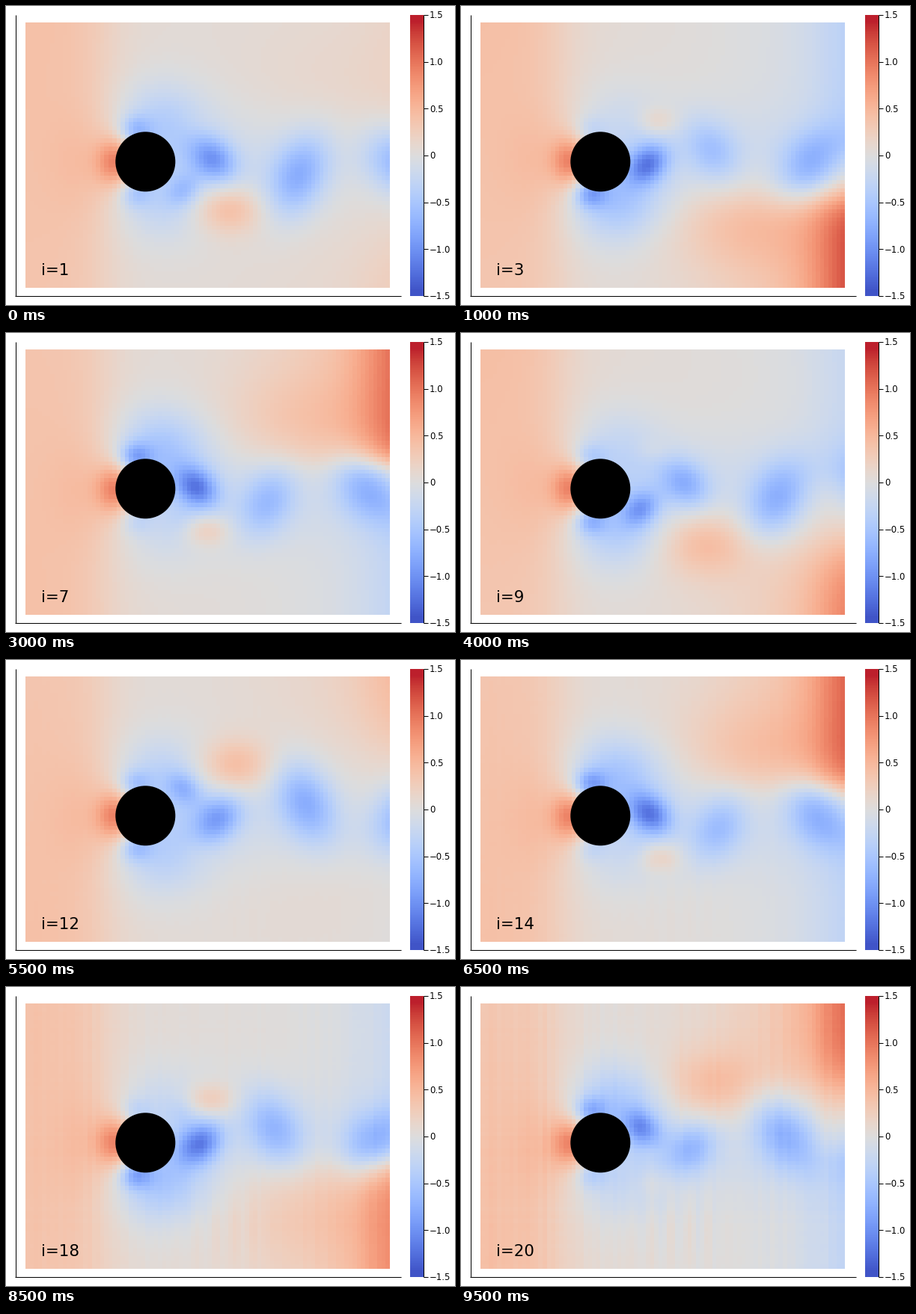
Animation of 600x400 px, one loop 10000 ms. Source, as a matplotlib script:

```python
import numpy as np
import matplotlib.pyplot as plt
from matplotlib.animation import FuncAnimation
from matplotlib.patches import Circle

W, H = 600, 400
FRAMES, INTERVAL = 20, 500
PERIOD = 7.158                      # shedding period, in frames
SPEED = 38                          # drift downstream, pixels per frame
LEFT, RIGHT, TOP, BOTTOM = 26, 513, 22, 377
COLS, ROWS = 88, 64
CX, CY, RADIUS = 186.3, 208.3, 40
PX = 0.72                           # one pixel in points

x = LEFT + (np.arange(COLS) + 0.5) * (RIGHT - LEFT) / COLS
y = TOP + (np.arange(ROWS) + 0.5) * (BOTTOM - TOP) / ROWS
X, Y = np.meshgrid(x, y)
rng = np.random.default_rng(4)
COL_NOISE = rng.normal(size=(1, COLS))
ROW_NOISE = rng.normal(size=(ROWS, 1))


def bell(u, centre, width):
    return np.exp(-((u - centre) / width) ** 2)


def sigmoid(u):
    return 1 / (1 + np.exp(-u))


def run_up(u, softness):
    """Rest, then ease into unit speed around u = 0."""
    return softness * np.log1p(np.exp(u / softness))


def bump(cx, cy, sx, sy, shear=0):
    dx, dy = X - cx, Y - cy
    return np.exp(-0.5 * (((dx + shear * dy) / sx) ** 2 + (dy / sy) ** 2))


def vortex(age, side):
    """Low-pressure core: forms off the axis, then drifts away."""
    cx = 234 + SPEED * run_up(age - 3.05, 1.2)
    dy = 40 * sigmoid((1.1 - age) / 0.35) + 19 * bell(age, 6.7, 2.3)
    strength = (0.7 * sigmoid(age / 0.6) + 0.25 * bell(age, 2.3, 1.2)
                - 0.28 * bell(age, 5.4, 1.0))
    sx = 15 + 1.7 * max(age, 0)
    sy = sx + 12 * bell(age, 7, 1.5)
    return -strength * bump(cx, CY + side * dy, sx, sy, 0.25 * side)


def crest(age, side):
    """High pressure between two cores, spreading as it moves outward."""
    travel = SPEED * run_up(age + 1, 0.6)
    strength = 0.47 * bell(age, 0.2, 2.3)
    sx = 16 + 0.4 * travel
    return strength * bump(255 + travel, CY + side * (52 + 0.27 * travel), sx, 0.7 * sx)


def outlet(age, side):
    """Pressure pulse along one half of the right border."""
    since_peak = (age - 1.7 + PERIOD / 2) % PERIOD - PERIOD / 2
    strength = 1.65 * bell(since_peak, 0, 1.8) - 0.45
    edge, softness = max(105 - 30 * age, 10), max(32 - 9 * age, 10)
    half = sigmoid((side * (Y - CY) - edge) / softness)
    return strength * half * (0.75 * bell(X, 535, 64) + 0.33 * bell(X, 500, 150))


def cylinder_side(age, side):
    swing = np.cos(2 * np.pi * (age - 2.1) / PERIOD)
    wide = (0.36 + 0.19 * swing) * bump(206, CY + side * 51, 44, 40)
    tight = (0.42 + 0.20 * swing) * bump(173, CY + side * 43, 15, 13)
    return -wide - tight


def pressure(n):
    p = 0.05 + 0.34 * sigmoid((132 - X) / 20)
    p += 0.75 * bump(147, CY, 17, 22) + 0.20 * bump(126, CY, 42, 48)
    p -= 0.20 * bump(310, CY, 110, 50)
    sway = np.cos(2 * np.pi * (n - 1.2) / PERIOD)
    p -= 0.045 * sway * (Y - CY) / 180 * bell(X, LEFT, 150)

    for side, delay in ((1, 0), (-1, PERIOD / 2)):
        age = (n + delay) % PERIOD
        p += cylinder_side(age, side) + outlet(age, side)
        for cycle in (-1, 0, 1):
            p += vortex(age + cycle * PERIOD, side)
            p += crest(age + cycle * PERIOD, side)

    # Row and column streaks slowly build up
    drift = ((n + 1) / FRAMES) ** 4
    p += drift * (0.014 * COL_NOISE + 0.006 * ROW_NOISE)
    p += drift * 0.08 * np.cos(2 * np.pi * (X - 255) / 25) * bump(295, 325, 38, 38)
    return p


fig = plt.figure(figsize=(W / 100, H / 100), dpi=100, facecolor="white")
ax = fig.add_axes([0, 0, 1, 1])
ax.axis("off")

heat = ax.imshow(pressure(0), cmap="coolwarm", vmin=-1.5, vmax=1.5,
                 extent=(LEFT, RIGHT, BOTTOM, TOP), interpolation="nearest",
                 aspect="auto")
ramp = np.clip(np.linspace(1, 0, 256), 0.02, 0.975)[:, None]
ax.imshow(ramp, cmap="coolwarm", vmin=0, vmax=1, extent=(540, 558, 388, 12),
          interpolation="nearest", aspect="auto")
ax.add_patch(Circle((CX, CY), RADIUS, facecolor="black", edgecolor="none", zorder=3))


def line(xs, ys):
    ax.plot(xs, ys, color="black", lw=PX, solid_capstyle="butt")


line([12.5, 12.5], [12, 388])
line([12, 528], [388, 388])
line([557.5, 557.5], [12, 388])
for k in range(7):
    value = 1.5 - 0.5 * k
    name = f"{value:.1f}".replace("-", "−") if value else "0"
    tick = 12 + k * 376 / 6
    line([558, 564], [tick, tick])
    ax.text(566, tick + 4.2, name, fontsize=8.4, family="DejaVu Sans", va="baseline")

label = ax.text(46.6, 360, "", fontsize=15.4, family="DejaVu Sans", va="baseline")
ax.set_xlim(0, W)
ax.set_ylim(H, 0)


def update(n):
    heat.set_data(pressure(n))
    label.set_text(f"i={n + 1}")
    return heat, label


anim = FuncAnimation(fig, update, frames=FRAMES, interval=INTERVAL, repeat=True)
plt.show()
```
